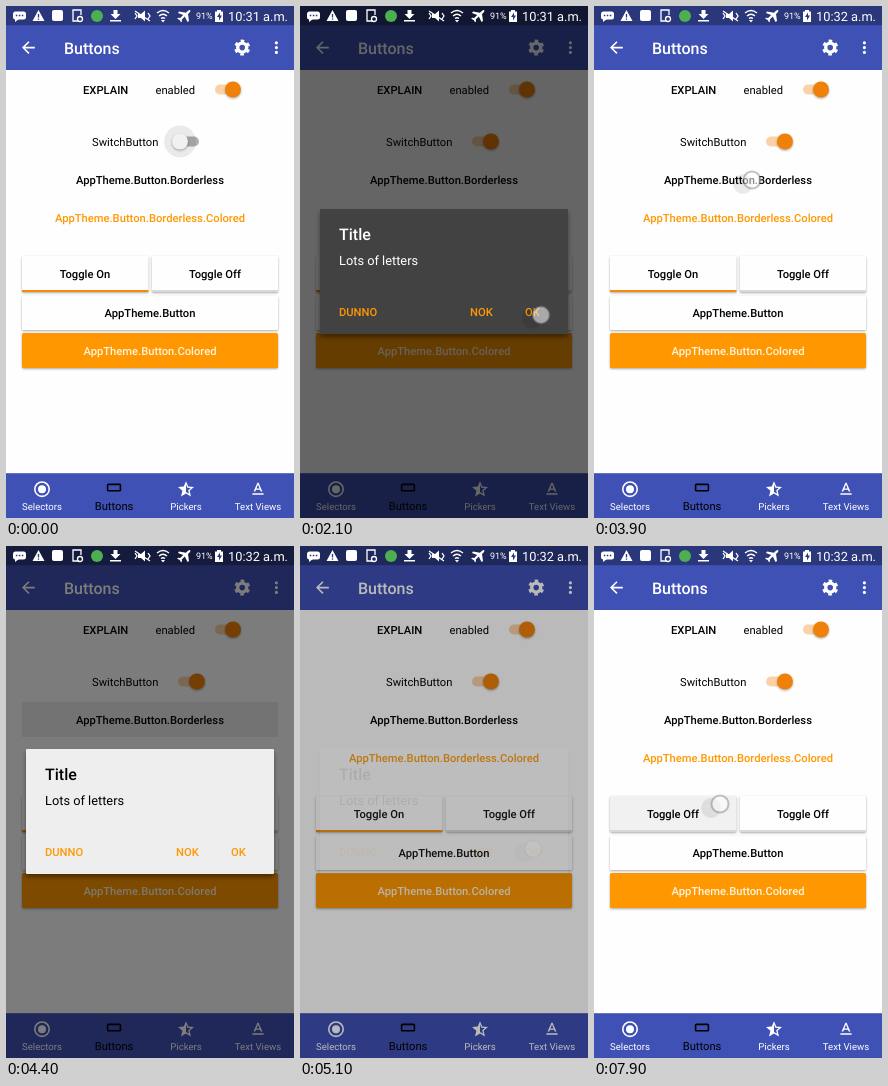
An HTML page for the animation above (8 s loop, 288 px wide and 512 px high).

```html
<!DOCTYPE html>
<html lang="en">
<head>
<meta charset="utf-8">
<title>Buttons</title>
<style>
html, body { margin: 0; width: 100%; height: 100%; overflow: hidden; background: #fefefe; }
svg { display: block; }
text { font: 11.2px Roboto, sans-serif; text-rendering: geometricPrecision; }
.b { font-weight: 500; }
.m { text-anchor: middle; }
.h { font-size: 16px; font-weight: 500; }
.nav { font-size: 9.6px; fill: #fff; }
.card { filter: drop-shadow(0 1px 1px #0005); }
.accent { fill: #ff9800; }
.line { fill: none; stroke: #fff; stroke-width: 1.6; }
.status { fill: #fff; }
.status .line { stroke-width: 1.3; }
</style>
</head>
<body>
<svg id="stage" width="288" height="512" viewBox="0 0 288 512">
  <rect width="288" height="512" fill="#fefefe"/>
  <rect width="288" height="64" fill="#3f51b5"/>
  <rect width="288" height="19.2" fill="#2b377b"/>

  <path fill="#fff" transform="translate(12.8 32) scale(.8)" d="M20 11H7.830l5.590-5.590L12 4l-8 8 8 8 1.410-1.410L7.830 13H20z"/>
  <text class="h" x="58" y="47.700" fill="#fff">Buttons</text>
  <g fill="none" stroke="#fff">
    <circle cx="236.200" cy="41.600" r="4.500" stroke-width="3.400"/>
    <circle cx="236.200" cy="41.600" r="6.800" stroke-width="2.400" stroke-dasharray="3.600 3.520" stroke-dashoffset="-1.800"/>
  </g>
  <path d="M270.400 36.800h0m0 4.800h0m0 4.800h0" stroke="#fff" stroke-width="3.200" stroke-linecap="round"/>

  <text class="b" x="77" y="88">EXPLAIN</text>
  <text x="149.500" y="88">enabled</text>
  <rect x="209" y="78.500" width="25" height="10" rx="5" fill="#fad2a8"/>
  <circle class="card" cx="227" cy="83.500" r="8" fill="#ef8109"/>
  <text x="86" y="140">SwitchButton</text>
  <rect id="track" x="172" y="130.500" width="21" height="10" rx="5"/>
  <circle id="halo" cy="135.500" r="16"/>
  <circle id="thumb" class="card" cy="135.500" r="8"/>

  <svg id="ripple" x="16" width="256" height="35"><circle cy="18"/></svg>
  <text class="b m" x="144" y="178">AppTheme.Button.Borderless</text>
  <text class="b m accent" x="144" y="216.200">AppTheme.Button.Borderless.Colored</text>

  <g id="left">
    <rect class="card" x="16" y="250" width="126.500" height="36" rx="1"/>
    <rect x="16" y="284" width="126.500" height="2"/>
    <text class="b m" x="79" y="272.200"></text>
  </g>
  <g id="right">
    <rect class="card" x="146" y="250" width="126" height="36" rx="1"/>
    <rect x="146" y="284" width="126" height="2"/>
    <text class="b m" x="209" y="272.200"></text>
  </g>
  <rect id="plain" class="card" x="16" y="290" width="256" height="34" rx="1"/>
  <text class="b m" x="144" y="310.800">AppTheme.Button</text>
  <rect class="card accent" x="16" y="327" width="256" height="35" rx="1.500"/>
  <text class="b m" x="144" y="349.200" fill="#fff3df">AppTheme.Button.Colored</text>

  <rect y="467.200" width="288" height="44.800" fill="#3f51b5"/>
  <circle class="line" cx="36" cy="483.200" r="7.200"/>
  <circle cx="36" cy="483.200" r="4" fill="#fff"/>
  <rect x="101.600" y="478.400" width="12.800" height="6.400" rx=".8" fill="none" stroke="#000" stroke-width="1.600"/>
  <path fill="#fff" fill-rule="evenodd" transform="translate(170.4 473.6) scale(.8)" d="M22 9.240l-7.190-.620L12 2 9.190 8.630 2 9.240l5.460 4.730L5.820 21 12 17.270 18.180 21l-1.630-7.030zM12 15.400V6.100l1.710 4.040 4.380.380-3.320 2.880 1 4.280z"/>
  <path fill="#fff" fill-rule="evenodd" transform="translate(242.4 473.6) scale(.8)" d="M5 17v2h14v-2zM9.500 12.800h5l.9 2.200h2.100L12.750 4h-1.500L6.500 15h2.100zM12 5.980L13.870 11h-3.740z"/>
  <text class="nav m" x="36" y="504">Selectors</text>
  <text class="m" x="108" y="504">Buttons</text>
  <text class="nav m" x="180" y="504">Pickers</text>
  <text class="nav m" x="252" y="504">Text Views</text>

  <rect id="scrim" width="288" height="512"/>

  <!-- The status icons stay bright above the dimmed screen. -->
  <g class="status">
    <rect x="7" y="5.500" width="13" height="8" rx="2.500"/>
    <path d="M9 13v3l4-3z"/>
    <path d="M9.800 9.500h1.500m1.500 0h1.500m1.500 0h1.500" stroke="#2b377b" stroke-width="1.500"/>
    <path d="M32.500 4l6 11h-12z"/>
    <path d="M32.500 8v3.500m0 1v1.200" stroke="#2b377b" stroke-width="1.300"/>
    <rect x="46" y="4" width="11" height="11" rx="2"/>
    <path class="line" d="M73 15h-6V4h8v5"/>
    <circle class="line" cx="74" cy="13" r="2.500"/>
    <circle cx="91" cy="10" r="6" fill="#4caf50"/>
    <path d="M107.500 4h4v4h3l-5 5-5-5h3zM104 14h11v1.600h-11z"/>
    <path d="M132 8h3l4-3.500v11L135 12h-3z"/>
    <path class="line" d="M129 5l15 10m-15-2l2-3-2-3m13 6l2-3-2-3"/>
    <path class="line" d="M151 7q6-5 12 0m-10 3q4-3.500 8 0m-6 2.500q2-1.500 4 0"/>
    <path d="M155 14h4l-2 2.500z"/>
    <path d="M184 4c1 1 0 2-2 4l1 7-1.500 1-2.700-5.500-3 3 .2 2-1 .8-1.300-2.300-2.500-1.300.8-1 2.200.2 3-3L172 7l1-1.500 7 1.200c2-2 3-3 4-2.700z"/>
    <text x="190" y="13" style="font-size:9px">91%</text>
    <path d="M211 4h4v1.500h2V16h-8V5.500h2z"/>
    <path d="M214 6.500l-3 4.500h2v3.500l3-5h-2z" fill="#2b377b"/>
    <text id="clock" x="282" y="15" text-anchor="end" style="font-size:12.8px"></text>
  </g>

  <g id="dialog">
    <rect id="panel" x="20" y="203" width="248" height="125" rx="1" style="filter:drop-shadow(0 3px 2px #0006)"/>
    <g id="message">
      <text class="h" x="39" y="234.200">Title</text>
      <text x="39" y="259" style="font-size:12.800px">Lots of letters</text>
    </g>
    <g class="accent">
      <text class="b" x="39" y="310">DUNNO</text>
      <text class="b" x="170" y="310">NOK</text>
      <text class="b" x="225" y="310">OK</text>
    </g>
  </g>
  <g id="touch">
    <circle cx="-9" cy="4" r="10" fill="#000" opacity=".08"/>
    <circle r="8.500" fill="#fff" fill-opacity=".55" stroke="#667" stroke-opacity=".4" stroke-width="2"/>
  </g>
</svg>
<script>
const LOOP = 8000, STEP = 100;
const $ = id => document.getElementById(id);
const set = (el, attrs) => {
  for (const key in attrs) el.setAttribute(key, attrs[key]);
};
const ramp = (t, from, to) => Math.min(1, Math.max(0, (t - from) / (to - from)));
const within = (t, from, to) => t >= from && t < to;

const dialogs = [
  { open: 1295, close: 2200, panel: '#424242', ink: '#fff' },
  { open: 4145, close: 4990, panel: '#eee', ink: '#000' }
];
// from, to, x, y
const touches = [
  [1100, 1350, 237, 212], [2000, 2300, 241, 309],
  [3900, 4200, 158, 174], [4850, 5130, 233, 303],
  [5800, 6100, 200, 307], [6600, 6850, 232, 268],
  [7000, 7250, 232, 268], [7700, 8100, 126, 258]
];

function drawSwitch(t) {
  const p = ramp(t, 50, 350), on = p > .5, cx = 174 + 17 * p;
  set($('track'), { fill: on ? '#fad2a8' : '#b0b0b0' });
  set($('thumb'), { cx, fill: on ? '#ef8109' : '#f1f1f1' });
  set($('halo'), { cx, fill: on ? '#ef8109' : '#000', opacity: .08 * (1 - ramp(t, 300, 600)) });
}

function drawRipple(t) {
  const second = t > 3000;
  const r = second ? 2 + (t - 3900) * .5 : 8 + (t - 1200) * .12;
  const shown = second ? t >= 3900 : t >= 1200;
  const fade = second ? ramp(t, 4400, 4700) : ramp(t, 1400, 1700);
  set($('ripple'), { y: second ? 156 : 194.5 });
  set($('ripple').firstChild, {
    cx: second ? 142 : 221,
    r: Math.max(0, r),
    opacity: shown ? .07 * (1 - fade) : 0
  });
}

function drawToggle(id, on, pressed) {
  const [card, bar, label] = $(id).children;
  set(card, { fill: pressed ? '#f1f1f1' : '#fefefe' });
  set(bar, { fill: on ? '#f58a0b' : '#d8d8d8' });
  label.textContent = on ? 'Toggle On' : 'Toggle Off';
}

function drawDialog(t) {
  const d = dialogs[t < 3000 ? 0 : 1];
  const rise = ramp(t, d.open, d.open + 300);
  const fall = ramp(t, d.close, d.close + 200);
  set($('scrim'), { opacity: .6 * rise * (1 - fall) });
  set($('dialog'), { opacity: Math.min(1, rise * 2.1) * Math.max(0, 1 - fall * 1.7) });
  set($('panel'), { fill: d.panel });
  set($('message'), { fill: d.ink });
}

function drawTouch(t) {
  const hit = touches.find(([from, to]) => within(t, from, to));
  set($('touch'), { opacity: hit ? 1 - ramp(t, hit[1] - 200, hit[1]) : 0 });
  if (hit) set($('touch'), { transform: `translate(${hit[2]} ${hit[3]})` });
}

function frame() {
  const t = Math.floor(performance.now() % LOOP / STEP) * STEP;
  $('clock').textContent = t < 3300 ? '10:31 a.m.' : '10:32 a.m.';
  drawSwitch(t);
  drawRipple(t);
  drawToggle('left', t < 7800, t >= 7700);
  drawToggle('right', within(t, 6700, 7100), within(t, 6600, 6800) || within(t, 7000, 7200));
  set($('plain'), { fill: within(t, 5800, 6200) ? '#f1f1f1' : '#fefefe' });
  drawDialog(t);
  drawTouch(t);
  requestAnimationFrame(frame);
}
frame();
</script>
</body>
</html>
```
